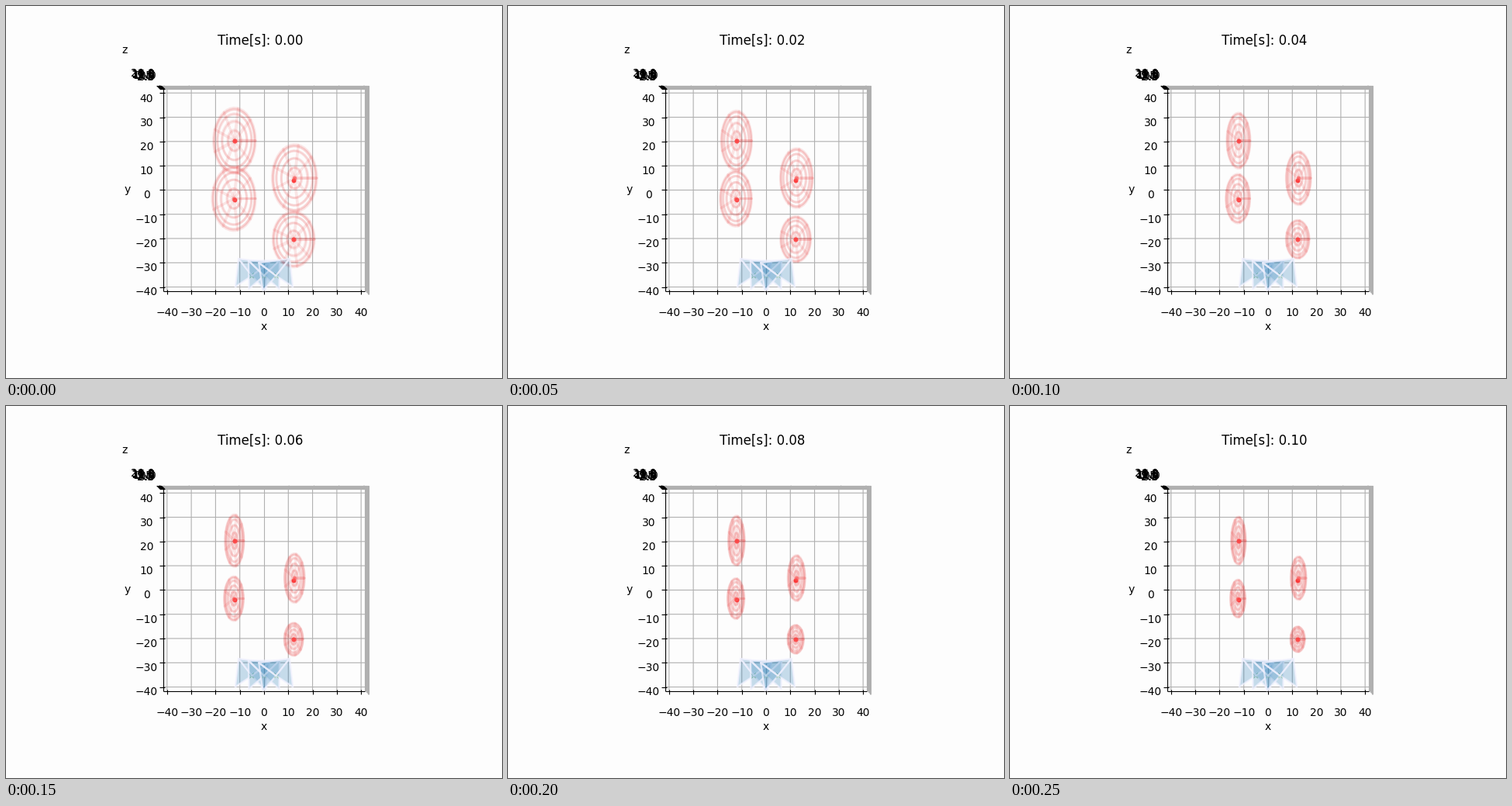
A matplotlib script for the animation above (0.3 s loop, 640x480 px).

```python
import numpy as np
import matplotlib.pyplot as plt
from matplotlib.animation import ArtistAnimation
from matplotlib.collections import LineCollection, PolyCollection

W, H = 640, 480
FRAMES = 6
CX, CY = 332.995, 237.405        # vanishing point of the top-down view
UNIT = 1.32705 / (250 / 3)       # data unit in view space
EDGE, Z_LOW, Z_HIGH = 125 / 3, -5 / 12, 20 + 5 / 12
DELTA, Z_DELTA = 80 / 12, 20 / 12
PER_POINT = 48 / 532.2
BACK, GRID = "#fdfdfd", "#b0b0b0"

fig = plt.figure(figsize=(6.4, 4.8), dpi=100, facecolor=BACK)
ax = fig.add_axes([0, 0, 1, 1])
ax.set(xlim=(0, W), ylim=(H, 0))
ax.axis("off")


def project(x, y, z):
    scale = UNIT * 1997.8 / (10 - (z - 10) * UNIT)
    return np.stack([CX + x * scale, CY - y * scale], axis=-1)


def segments(paths, color):
    lines = [[project(*p) for p in path] for path in paths]
    ax.add_collection(LineCollection(lines, colors=color, linewidths=0.8))


def label(point, text, va):
    ax.text(*project(*point), text, ha="center", va=va, fontsize=10)


def draw_box():
    ticks = range(-40, 41, 10)
    levels = np.arange(0, 20.1, 2.5)
    a, z = EDGE, Z_LOW
    grid = []
    for t in ticks:
        grid.append([(t, -a, z), (t, a, z), (t, a, Z_HIGH)])
        grid.append([(-a, t, z), (a, t, z), (a, t, Z_HIGH)])
    grid += [[(-a, a, v), (a, a, v), (a, -a, v)] for v in levels]
    segments(grid, GRID)

    segments([[(a, -a, z), (-a, -a, z)], [(-a, -a, z), (-a, a, z)],
              [(-a, a, z), (-a, a, Z_HIGH)]], "black")
    outer, inner = -a - 0.2 * DELTA, -a + 0.1 * DELTA
    marks = [[(t, outer, z), (t, inner, z)] for t in ticks]
    marks += [[(outer, t, z), (inner, t, z)] for t in ticks]
    marks += [[(outer, a, v), (inner, a, v)] for v in levels]
    segments(marks, "black")

    off = a + 11.5 * PER_POINT * DELTA
    low = z - 11.5 * PER_POINT * Z_DELTA
    for t in ticks:
        text = str(t).replace("-", "\u2212")
        label((t, -off, low), text, "top")
        label((-off, t, low), text, "top")
    for v in levels:
        label((-off, off, v), f"{v:.1f}", "top")

    off = a + 25 * PER_POINT * DELTA
    low = z - 25 * PER_POINT * Z_DELTA
    label((0, -off, low), "x", "center")
    label((-off, 0, low), "y", "center")
    label((-off, off, 10), "z", "center")


def draw_cameras():
    """Three open view pyramids, the outer two turned towards the middle."""
    base = np.array([(-20, -19.5), (20, -19.5), (19.5, 17), (-19.5, 17)])
    for side in (-1, 0, 1):
        apex = np.array([CX + 15.6 * side, 348])
        c, s = np.cos(0.13 * side), np.sin(-0.13 * side)
        ul, ur, lr, ll = apex + base @ np.array([(c, s), (-s, c)])
        faces = [(apex, ul, ll), (apex, ul, ur), (apex, ur, lr)]
        ax.plot(*apex, "x", color="green", ms=5, mew=1.2, zorder=3)
        ax.add_collection(PolyCollection(
            faces, facecolors=(0.12, 0.47, 0.71, 0.25),
            edgecolors=(0.95, 0.95, 1, 0.75), linewidths=1.7, zorder=4))


def ellipsoid(cx, cy, rx, ry):
    """Wireframe seen from above, with a slight perspective split."""
    u = np.linspace(0, 2 * np.pi, 40)
    v = np.linspace(0, np.pi, 11)
    height = 0.25 * rx * np.cos(v)

    def point(a, b, z):
        depth = 1 + z * UNIT / 10
        x = cx + rx * np.cos(a) * np.sin(b)
        y = cy - ry * np.sin(a) * np.sin(b)
        return np.stack([CX + (x - CX) * depth, CY + (y - CY) * depth], axis=-1)

    rings = [point(u, b, z) for b, z in zip(v, height)]
    spokes = [point(a, v, height) for a in np.linspace(0, 2 * np.pi, 10)]
    return LineCollection(rings + spokes, colors=(0.9, 0.1, 0.1), alpha=0.1,
                          linewidths=2.1, zorder=2)


# True position, estimate offset (px), width factor, first and last half height.
TARGETS = [
    ((-12, 20), (0, 0), 0.99, 42.5, 31),
    ((-12, -4), (-0.8, -1.6), 1.02, 41.5, 24.5),
    ((12, 4), (1.1, -2.6), 1.05, 43.5, 28),
    ((12, -20), (0, 0), 0.98, 36, 16.5),
]


def frame_artists(i):
    artists = [ax.text(328, 49.27, f"Time[s]: {0.02 * i:.2f}", ha="center",
                       va="baseline", fontsize=12)]
    half_width = 7.6 + 20 * 0.62 ** i
    end = 0.75 ** (FRAMES - 1)
    fade = (0.75 ** i - end) / (1 - end)
    for position, offset, factor, first, last in TARGETS:
        true = project(*position, 10)
        guess = true + offset
        half_height = last + (first - last) * fade
        artists.append(ax.add_collection(
            ellipsoid(*guess, half_width * factor, half_height)))
        for spot, color, alpha in ((true, "red", 0.7), (guess, "#ff6060", 0.6)):
            artists += ax.plot(*spot, "o", color=color, alpha=alpha,
                               ms=4.2, mew=0, zorder=3)
    return artists


draw_box()
draw_cameras()
anim = ArtistAnimation(fig, [frame_artists(i) for i in range(FRAMES)],
                       interval=50, repeat=True, repeat_delay=0)
plt.show()
```
